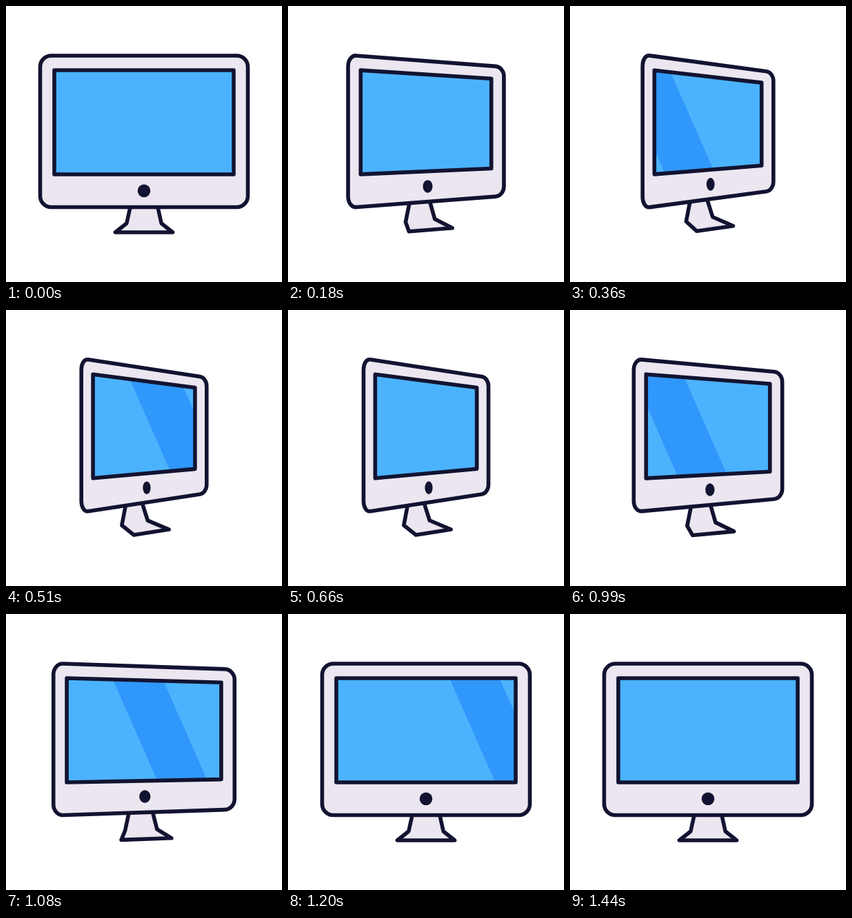
An HTML page for the animation above (1620 ms loop, 400 by 400 pixels).

```html
<!DOCTYPE html>
<html lang="en">
<head>
<meta charset="utf-8">
<title>Turning monitor</title>
<style>
  html, body { margin: 0; height: 100%; overflow: hidden; background: #fff; }
  svg { display: block; width: 100%; height: 100%; }
  .line { stroke: #121331; stroke-width: 5.58; stroke-linejoin: round; stroke-linecap: round; }
</style>
</head>
<body>
<svg viewBox="0 0 400 400">
  <clipPath id="clip"><path id="glass"/></clipPath>
  <path id="stand" class="line" fill="#ebe6ef"/>
  <path id="body" class="line" fill="#ebe6ef"/>
  <path id="screen" fill="#4bb3fd"/>
  <g clip-path="url(#clip)" fill="#3097fb">
    <path id="shineA" d="M-32 95.5h72.5l64 145.5h-72.5z"/>
    <path id="shineB" d="M-32 95.5h72.5l64 145.5h-72.5z"/>
  </g>
  <path id="bezel" class="line" fill="none"/>
  <ellipse id="button" fill="#121331"/>
</svg>
<script>
const LOOP = 1620, STEP = 30, TURN = 600, SWEEP = 840;
const MID = 200, HORIZON = 181.75, PIVOT = 67, TILT = 0.00084;

const body = { half: 150.5, top: 72, bottom: 291.5, radius: 16, squeeze: 0.4 };
const screen = { half: 130, top: 93, bottom: 244, radius: 0, squeeze: 0.435 };

// Stand levels from top to foot; all but half and y apply to the full turn.
const levels = [
  { half: 18.7, y: 286, squeeze: 8, shift: -15, lift: 9.5, tilt: 1.5 },
  { half: 25.2, y: 315, squeeze: 6.5, shift: -13.5, lift: 6.5, tilt: 3.5 },
  { half: 41.6, y: 328, squeeze: 16.3, shift: 10.8, lift: 6, tilt: 4 }
];

const $ = id => document.getElementById(id);
const set = (id, attrs) => {
  for (const name in attrs) $(id).setAttribute(name, attrs[name]);
};
const clamp = x => Math.min(1, Math.max(0, x));
const smooth = s => s * s * (3 - 2 * s);

// cubic-bezier(1/3, 0, 0, 1), solved by bisection
function ease(x) {
  let lo = 0, hi = 1;
  for (let i = 0; i < 30; i++) {
    const s = (lo + hi) / 2;
    if (s * (1 - s) ** 2 + s ** 3 < x) lo = s; else hi = s;
  }
  return smooth(hi);
}

// Rounded rectangle whose right side recedes as turn goes from 0 to 1.
function panel({ half, top, bottom, radius, squeeze }, turn) {
  const project = (x, y) => [
    MID + (x - MID) * (1 - turn * squeeze),
    y - (y - HORIZON) * turn * TILT * (x - PIVOT)
  ];
  const arc = [[0, 1], [0, 0.448], [0.448, 0], [1, 0]];
  const corners = [[-1, -1], [1, -1], [1, 1], [-1, 1]].map(([sx, sy], i) => {
    const points = arc.map(([dx, dy]) => project(
      MID + sx * (half - dx * radius),
      (sy < 0 ? top : bottom) - sy * dy * radius
    ));
    const [start, ...curve] = i % 2 ? points.reverse() : points;
    return `${start}C${curve}`;
  });
  return `M${corners.join('L')}z`;
}

function standPath(turn) {
  const side = sign => levels.map(l => [
    MID + sign * (l.half - turn * l.squeeze) + turn * l.shift,
    l.y - turn * (l.lift + sign * l.tilt)
  ]);
  return `M${[...side(-1), ...side(1).reverse()]}z`;
}

function sweep(id, start, t) {
  const x = -31 + 394 * smooth(clamp((t - start) / SWEEP));
  set(id, { transform: `translate(${x})` });
}

function draw() {
  const t = Math.floor(performance.now() % LOOP / STEP) * STEP;
  const turn = ease(clamp(1 - Math.abs(t - TURN) / TURN));

  set('stand', { d: standPath(turn) });
  set('body', { d: panel(body, turn) });
  for (const id of ['glass', 'screen', 'bezel']) set(id, { d: panel(screen, turn) });
  set('button', {
    cx: MID + 4 * turn, cy: 267.8 - 10.2 * turn,
    rx: 9.3 - 3.7 * turn, ry: 9.3
  });
  sweep('shineA', 28, t);
  sweep('shineB', 30 + TURN, t);
  requestAnimationFrame(draw);
}
draw();
</script>
</body>
</html>
```
